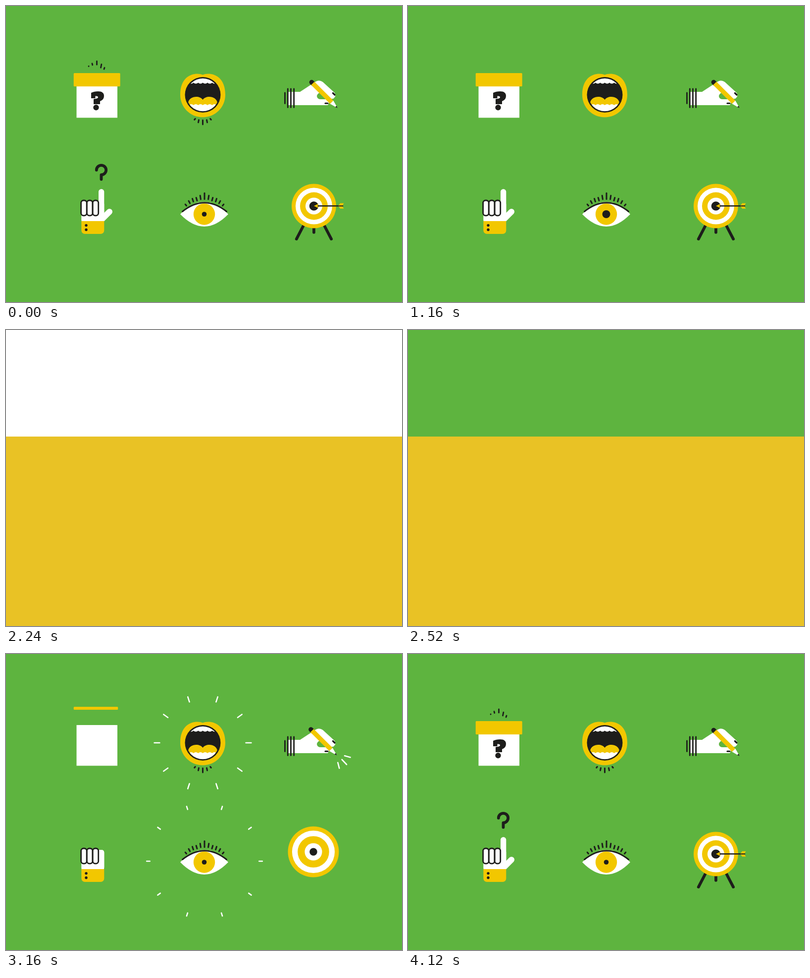
An HTML page with a canvas that plays this animation: 800 by 600 pixels, repeating every 4160 ms.

```html
<!DOCTYPE html>
<html lang="en">
<head>
<meta charset="utf-8">
<title>Six icons</title>
<style>
html, body { margin: 0; width: 100%; height: 100%; overflow: hidden; background: #5eb43f; }
canvas { display: block; }
</style>
</head>
<body>
<canvas id="stage" width="800" height="600"></canvas>
<script>
const LOOP = 4160, STEP = 40, TAU = Math.PI * 2;
const GREEN = '#5eb43f', YELLOW = '#f2c700', GOLD = '#e9c225', BLACK = '#1d1d1b', WHITE = '#fff';
const c = document.getElementById('stage').getContext('2d');

// Timing helpers
const clamp = v => Math.max(0, Math.min(1, v));
const seg = (t, a, b) => clamp((t - a) / (b - a));
const outQuad = v => 1 - (1 - v) ** 2;
const inOutCubic = v => v < .5 ? 4 * v ** 3 : 1 - 4 * (1 - v) ** 3;
const outBack = (v, k = 1.7) => v <= 0 ? 0 : 1 + (k + 1) * (v - 1) ** 3 + k * (v - 1) ** 2;
const cycle = t => ((t % 800) + 800) % 800;

// Drawing helpers
function rect(x, y, w, h, color, r = 0) {
  c.fillStyle = color;
  c.beginPath();
  c.roundRect(x, y, w, h, r);
  c.fill();
}
function disc(x, y, r, color) {
  c.fillStyle = color;
  c.beginPath();
  c.arc(x, y, Math.max(0, r), 0, TAU);
  c.fill();
}
function shape(d, color) {
  c.fillStyle = color;
  c.fill(new Path2D(d));
}
function line(x1, y1, x2, y2, width, color = BLACK) {
  c.strokeStyle = color;
  c.lineWidth = width;
  c.beginPath();
  c.moveTo(x1, y1);
  c.lineTo(x2, y2);
  c.stroke();
}
// Part of a line, from tail to head (0..1)
function dash([x1, y1, x2, y2], tail, head, width, color) {
  if (head <= 0 || tail >= 1) return;
  const dx = x2 - x1, dy = y2 - y1;
  line(x1 + dx * tail, y1 + dy * tail, x1 + dx * head, y1 + dy * head, width, color);
}
function grouped(draw) {
  c.save();
  draw();
  c.restore();
}
function popped(x, y, scale, draw) {
  if (scale <= 0) return;
  grouped(() => {
    c.translate(x, y);
    c.scale(scale, scale);
    c.translate(-x, -y);
    draw();
  });
}
function burst(x, y, t) {
  const head = Math.min(133, 50 + t * .237), tail = 50 + (t - 74) * .29;
  if (t <= 0 || tail >= 133) return;
  for (let i = 0; i < 10; i++) {
    const a = i * TAU / 10, from = Math.max(50, tail);
    line(x + from * Math.cos(a), y + from * Math.sin(a),
         x + head * Math.cos(a), y + head * Math.sin(a), 2.6, WHITE);
  }
}

const boxRays = [[169, 127, 167, 122], [175.8, 124, 174, 116.5], [183.5, 121, 183.5, 112],
                 [191.5, 125, 193, 117.5], [198, 128, 200, 122.5]];

function box(u, idle) {
  popped(184, 185, outBack(seg(u, 2680, 2920)), () => rect(142.5, 144, 82.5, 82.5, WHITE));
  const wide = seg(u, 3000, 3168);
  if (wide) {
    const tall = outQuad(seg(u, 3200, 3320)), fall = seg(u, 3320, 3480) ** 2;
    rect(136.7, 107 + 29 * fall, 94 * wide, 6 + 21 * tall, YELLOW, 1.5);
  }
  popped(184, 192, outBack(seg(u, 3480, 3720)), () => {
    shape('M172 187V176Q178 173 186 173Q198 173 198 182.5Q198 190 190 193V199H177V188.5Q186 188 186 185Q186 182 180.5 182.5V187Z', BLACK);
    disc(182, 205.7, 5.7, BLACK);
  });
  if (u < 3900) return;
  const p = cycle(idle + 220);
  boxRays.forEach((ray, i) => {
    const q = p - i * 40;
    dash(ray, clamp((q - 115) / 110), clamp(q / 110), 2.8, BLACK);
  });
}

function scallops(y, dir) {
  let d = `M360 ${y - 30 * dir}V${y}`;
  for (let i = 0; i < 8; i++) d += 'q4.7 ' + 4 * dir + ' 9.4 0';
  return d + `V${y - 30 * dir}Z`;
}
function mouth(u, idle) {
  popped(397.5, 181, outBack(seg(u, 2720, 2960)), () => {
    shape('M397.5 139.5C410 134 443 137 443 180C443 205 423 225.5 397.5 225.5C372 225.5 352 205 352 180C352 137 385 134 397.5 139.5Z', YELLOW);
    disc(397.5, 180, 36, BLACK);
    grouped(() => {
      c.beginPath();
      c.arc(397.5, 180, 33.2, 0, TAU);
      c.clip();
      shape(scallops(155.5, 1), WHITE);
      shape('M368 196C370 183 390 180 397.5 190C405 180 425 183 427 196L424 208H371Z', YELLOW);
      shape(scallops(201, -1), WHITE);
    });
  });
  burst(397.5, 180, u - 2958);
  if (u < 3000) return;
  const p = cycle(idle + 280), tail = clamp((p - 290) / 110), head = clamp(p / 110);
  dash([397.5, 231.5, 397.5, 240], tail, head, 3);
  for (const s of [-1, 1]) {
    dash([397.5 + 8 * s, 231, 397.5 + 9 * s, 236], tail, head, 3);
    dash([397.5 + 15.2 * s, 228.5, 397.5 + 16.8 * s, 230.5], tail, head, 3);
  }
}

const sparks = [[677, 204.5, 698, 210], [673, 208, 690, 226], [668.5, 213, 674, 234]];

function hand(u) {
  popped(617, 180, outBack(seg(u, 2760, 3000)), () => {
    shape('M569 174H594L626 153Q633 149 640 154L664 176Q668 183 661 188H650Q655 195 650 201H569Z', WHITE);
    shape('M633 176Q628 179 628 183Q629 189 636 189H648L637 177Z', GREEN);
    line(563.5, 176, 563.5, 197.5, 2.8);
    for (const x of [569.3, 575.5, 581.7]) line(x, 168, x, 205.5, 2.8);
    grouped(() => {
      const back = 1.5 * (1 - seg(u, 3160, 3280));
      c.translate(670 - back, 207 - back);
      c.rotate(Math.PI / 4);
      rect(-79, -4.7, 14, 9.4, BLACK, 4.5);
      rect(-71, -4.7, 54, 9.4, YELLOW);
      shape('M-17 -4.7L0 0L-17 4.7Z', WHITE);
      shape('M-5 -1.8L0 0L-5 1.8Z', BLACK);
    });
    line(660.5, 176.5, 664, 180, 3.4);
    line(645, 197.3, 650, 197.3, 3);
  });
  const tail = seg(u, 3100, 3280), head = seg(u, 3000, 3180);
  sparks.forEach(s => dash(s, tail, head, 2.6, WHITE));
}

function fist(u, idle) {
  popped(175, 430, outBack(seg(u, 2800, 3040)), () => {
    const index = 26 * outBack(seg(u, 3240, 3440)), thumb = outBack(seg(u, 3320, 3520));
    rect(152.3, 397, 46, 42, WHITE, 5);
    rect(187, 397 - index, 11.3, 40 + index, WHITE, 5.6);
    if (thumb) line(192, 434, 192 + 17 * thumb, 434 - 17 * thumb, 12, WHITE);
    rect(152.3, 436, 46, 26, YELLOW, [0, 0, 7, 7]);
    c.strokeStyle = BLACK;
    c.lineWidth = 2.8;
    for (let i = 0; i < 3; i++) {
      rect(151.6 + i * 11.8, 394, 11.5, 30.8, WHITE, 5);
      c.stroke();
    }
    disc(162, 444.6, 2.7, BLACK);
    disc(162, 453.5, 2.7, BLACK);
  });
  // Question hook drawn on and off above the fingertip
  if (u < 3880) return;
  const p = cycle(idle + 240), len = 55;
  const head = len * inOutCubic(clamp(p / 200)), tail = len * inOutCubic(seg(p, 250, 400));
  if (head - tail < .1) return;
  grouped(() => {
    c.strokeStyle = BLACK;
    c.lineWidth = 5.8;
    c.setLineDash([head - tail, 200]);
    c.lineDashOffset = -tail;
    c.stroke(new Path2D('M182.8 332.5A9.7 9.7 0 1 1 192.5 342.2V351.3'));
  });
}

// Half of the lashes, from the middle outwards: offset and y at tip and root
const lashes = [[0, 379.3, 0, 391.5], [8.8, 384.3, 7.6, 391.8], [16.8, 388.5, 15, 394.5],
                [24.5, 390.5, 22.5, 396.5], [32, 395, 29.3, 400], [38.8, 402, 36.5, 404.8]];

function eye(u, t) {
  const open = .5 - .5 * Math.cos(Math.PI * Math.min(1, Math.abs(t - 600) / 134));
  const pupil = 4.8 + 3.2 * (seg(t, 400, 520) - seg(t, 1160, 1360));
  popped(400.5, 421, outBack(seg(u, 2640, 2880)), () => {
    const bulge = 50 * open;
    const lens = new Path2D(`M352 422Q400.5 ${422 - bulge} 449 422Q400.5 ${422 + bulge} 352 422Z`);
    c.fillStyle = WHITE;
    c.fill(lens);
    grouped(() => {
      c.clip(lens);
      disc(400.5, 422, 21.7, YELLOW);
      disc(400.5, 422, pupil, BLACK);
    });
    c.strokeStyle = BLACK;
    c.lineWidth = 3;
    const end = 418 - 1.5 * open;
    c.stroke(new Path2D(`M356.5 ${end}Q401 ${421 - 40 * open} 445.5 ${end}`));
    lashes.forEach(([tipX, tipY, rootX, rootY], i) => {
      const k = 1 - (1 - open) * (1 - .7 * (i / 5) ** 2), y = v => 422 - (422 - v) * k;
      for (const s of i ? [-1, 1] : [1])
        line(401 + s * tipX, y(tipY), 401 + s * rootX, y(rootY), 3);
    });
  });
  burst(401, 420, u - 2878);
}

function target(u) {
  const legs = outQuad(seg(u, 3280, 3440)), cy = 401 + 4.5 * seg(u, 3220, 3360);
  for (const s of [-1, 1]) dash([622 + 21 * s, 445, 622 + 35.2 * s, 472.3], 0, legs, 5.8, BLACK);
  dash([622, 448, 622, 458.8], 0, legs, 5.8, BLACK);
  [45, 37, 28, 17, 9.3].forEach((r, i) => {
    const k = outBack(seg(u, 2904 + i * 42, 3304 + i * 42), 2.3);
    disc(622 - (405.5 - cy) / 4.5, cy, r * k, i === 4 ? BLACK : i % 2 ? WHITE : YELLOW);
  });
  const fly = seg(u, 3480, 3680);
  if (!fly) return;
  grouped(() => {
    c.translate(180 * (1 - fly), 0);
    line(629, 405.3, 680, 405.3, 2.4);
    shape('M622 405.3L631.5 400.8L629.5 405.3L631.5 409.8Z', YELLOW);
    shape('M671.5 405.3L675 399.8H682.5L680 404.2H673ZM671.5 405.3L675 410.8H682.5L680 406.4H673Z', YELLOW);
  });
}

function draw(t) {
  rect(0, 0, 800, 600, GREEN);
  c.lineCap = 'round';
  c.lineJoin = 'round';
  // Before the wipe every icon is already complete
  const before = t < 2100, u = before ? 1e4 : t, idle = before ? t : t - 4120;
  box(u, idle);
  mouth(u, idle);
  hand(u);
  fist(u, idle);
  eye(u, t);
  target(u);

  if (t < 2160) {
    rect(0, 0, 800, 600 * inOutCubic(seg(t, 1720, 1960)), WHITE);
  } else if (t < 2600) {
    const top = 600 * (1 - outQuad(seg(t, 2160, 2360)));
    const green = 600 * seg(t, 2400, 2600) ** 2;
    rect(0, 0, 800, 600, WHITE);
    rect(0, top, 800, 600 - top, GOLD);
    rect(0, 0, 800, green, GREEN);
  }
}

const start = performance.now();
function tick() {
  const t = (performance.now() - start) % LOOP;
  draw(Math.floor(t / STEP) * STEP);
  requestAnimationFrame(tick);
}
tick();
</script>
</body>
</html>
```
